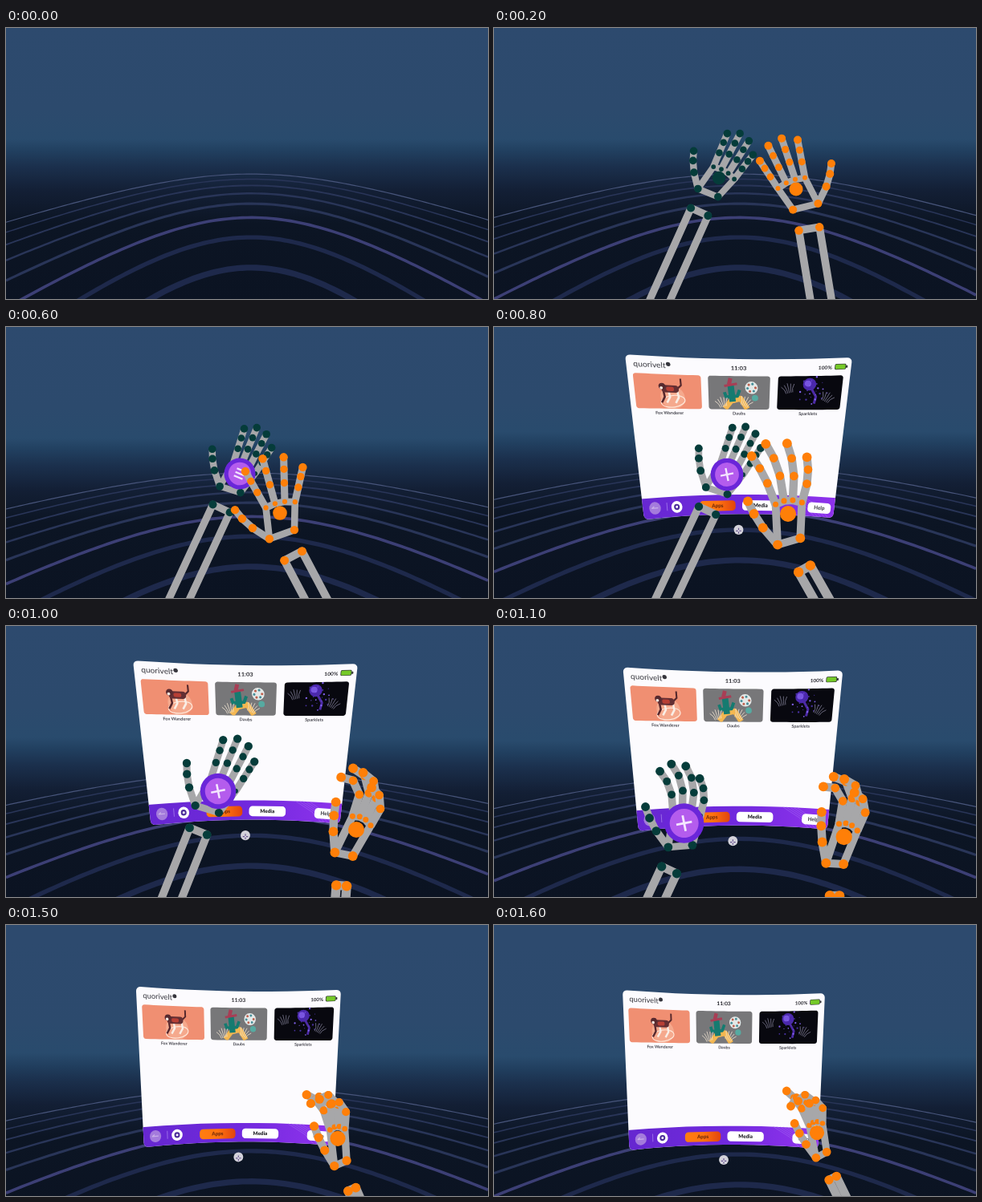
Write an HTML page with a canvas that moves like this. It is 600 by 338 pixels and loops after 1.7 s.

```html
<!DOCTYPE html>
<html lang="en">
<head>
<meta charset="utf-8">
<title>Hand menu</title>
<style>
html, body { margin: 0; width: 100%; height: 100%; overflow: hidden; background: #0b1424; }
canvas { display: block; width: 600px; height: 338px; }
</style>
</head>
<body>
<canvas id="stage" width="600" height="338"></canvas>
<script>
const ctx = document.getElementById('stage').getContext('2d');
const LOOP = 1700, STEP = 100, TAU = Math.PI * 2;
const ORANGE = '#ff7f08', TEAL = '#053c3a', BONE = '#a7a7a9', PURPLE = '#6a26d9';

const clamp = (x, lo, hi) => Math.min(hi, Math.max(lo, x));
const ramp = (t, from, to) => clamp((t - from) / (to - from), 0, 1);
const rad = deg => deg * Math.PI / 180;

// Linear track: one value list per key time
const track = (...keys) => t => {
  const i = keys.findIndex(k => k[0] > t);
  if (i <= 0) return keys[i ? keys.length - 1 : 0].slice(1);
  const [a, b] = [keys[i - 1], keys[i]], p = ramp(t, a[0], b[0]);
  return a.map((x, n) => x + (b[n] - x) * p).slice(1);
};

// time, palm x, y, tilt, width (negative: thumb on the left), scale, fan, index curl, fist curl, elbow x
const rightPose = track(
  [200, 376, 201, -19, 1, 1, 7.5, 0, 0, 408],
  [600, 341, 232, -14, -.95, 1.08, 14, 0, 0, 389],
  [800, 366, 233, -8, -.65, 1.4, 12, 6, 10, 411],
  [1000, 436, 254, 22, -.5, 1.4, 5, 45, 40, 416],
  [1300, 435, 281, 0, -.4, 1.5, 8, 45, 45, 440],
  [1600, 402, 259, -15, -.4, 1.15, 12, 15, 60, 436]);
const leftPose = track(
  [200, 280, 187, 28, -.9, .93, 5, 0, 0, 204],
  [600, 291, 183, 23, -.9, .93, 5, 0, 0, 213],
  [800, 290, 184, 24, -.9, .97, 5, 0, 0, 211],
  [1000, 264, 206, 23, -.9, 1.06, 5, 0, 0, 204],
  [1300, 182, 326, -40, -.6, 1.4, 8, 45, 50, 190]);

// Menu sheet: left, top, width of the top edge
const panelPose = track([800, 163, 34, 283], [1000, 158, 43, 280], [1300, 165, 68, 262], [1600, 160, 81, 252]);

function disc(x, y, r, color) {
  ctx.fillStyle = color;
  ctx.beginPath();
  ctx.arc(x, y, r, 0, TAU);
  ctx.fill();
}

function line(points, color, width) {
  ctx.strokeStyle = color;
  ctx.lineWidth = width;
  ctx.beginPath();
  points.forEach(p => ctx.lineTo(...p));
  ctx.stroke();
}

function pill(x, y, w, h, color, r = h / 2) {
  ctx.fillStyle = color;
  ctx.beginPath();
  ctx.roundRect(x - w / 2, y - h / 2, w, h, r);
  ctx.fill();
}

function blend(x0, y0, x1, y1, ...stops) {
  const g = ctx.createLinearGradient(x0, y0, x1, y1);
  stops.forEach(s => g.addColorStop(...s));
  return g;
}

function label(text, size, weight = 600, color = '#26262c', align = 'center') {
  ctx.font = `${weight} ${size}px Lato, sans-serif`;
  ctx.textAlign = align;
  ctx.textBaseline = 'middle';
  ctx.fillStyle = color;
  ctx.fillText(text, 0, 0);
}

function drawFloor(t) {
  const dy = t < 700 ? 0 : -8 + 33 * (t - 800) / 800;
  const spread = 180 + 50 * ramp(t, 0, 800);
  ctx.fillStyle = blend(0, dy, 0, 338 + dy, [0, '#2d4a6e'], [.3, '#2c4a6d'], [.41, '#294b6d'],
    [.455, '#213f5f'], [.51, '#1b304d'], [.6, '#131f35'], [.72, '#0c1524'], [1, '#0b1322']);
  ctx.fillRect(0, 0, 600, 338);
  // Concentric rings around the viewer project to hyperbolas
  for (let k = 7; k >= 0; k--) {
    const a = 1 / (.00559 + .0015 * k), pts = [];
    for (let x = 0; x <= 600; x += 6) pts.push([x, 120 + dy + a * Math.hypot(1, (x - 305) / spread)]);
    const color = k === 2 ? '#3c3f75' : k === 7 ? '#47547a' : k < 2 ? '#1e294b' : '#293558';
    line(pts, color, k === 2 ? 3.6 : Math.max(1.1, (a - 40) / 19));
  }
}

function drawHand([x, y, tilt, width, scale, fan, curl, fist, elbow], color) {
  const c = Math.cos(rad(tilt)) * scale, s = Math.sin(rad(tilt)) * scale;
  const place = ([px, py]) => [x + px * c - py * s, y + px * s + py * c];
  const flip = clamp(width * 1.7, -1, 1), r = 5 * Math.sqrt(scale), w = r * 1.75;

  const thumb = [0, .4, .72, 1].map(p =>
    place([width * (20 + 32 * p + 4 * Math.sin(p * Math.PI)), 26 - 42 * p]));
  const fingers = [0, 1, 2, 3].map(i => {
    const len = 54 - 4 * (i - 1.2) ** 2;
    let p = [(15 - 12 * i) * width, -12 + 1.3 * (i - 1.3) ** 2];
    const joints = [p];
    [.42, .31, .27].forEach((part, n) => {
      const a = rad(fan * (1.1 - i) + n * (i ? fist : curl));
      p = [p[0] + flip * Math.sin(a) * len * part, p[1] - Math.cos(a) * len * part];
      joints.push(p);
    });
    return joints.map(place);
  });
  const heel = place([-12 * width, 23]);

  // Forearm: two bones running from below the wrist past the elbow
  const mx = (thumb[0][0] + heel[0]) / 2, my = (thumb[0][1] + heel[1]) / 2;
  const dx = elbow - mx, dy = Math.max(20, 345 - my), d = Math.hypot(dx, dy);
  const ux = dx / d, uy = dy / d, half = 13 * Math.abs(width);
  const bone = (side, along) => [mx + ux * along + uy * side * half, my + uy * along - ux * side * half];
  const near = 28 * scale, far = near + 200;

  ctx.lineJoin = 'round';
  line([bone(-1, far), bone(-1, near), bone(1, near), bone(1, far)], BONE, w * 1.1);
  [-1, 1].forEach(k => disc(...bone(k, near), r * 1.05, color));
  line([heel, thumb[0], ...fingers.map(f => f[0]), heel], BONE, w * .95);
  disc(x, y, r * 1.7, color);
  disc(...heel, r, color);
  [thumb, ...fingers].forEach((f, n) => {
    line(f, BONE, w);
    f.forEach((p, i) => disc(...p, i === 3 || !n ? r : i ? r * .9 : r * .6, color));
  });
}

function drawButton(x, y, r, open) {
  ctx.save();
  ctx.translate(x, y);
  ctx.scale(r / 20, r / 20);
  ctx.rotate(open ? -.2 : .4);
  disc(0, 0, 20, PURPLE);
  disc(0, 0, 14.6, '#b45ced');
  const bars = open ? [[[-8, 0], [8, 0]], [[0, -8], [0, 8]]]
                    : [-5, 0, 5].map(h => [[-6, h], [6, h]]);
  bars.forEach(b => line(b, '#f5e6ff', 2.3));
  ctx.restore();
}

// App pictures, drawn in a 78 by 43 box
function fox() {
  disc(43, 28, 14, '#f5a98d');
  ctx.strokeStyle = '#ffe6d8';
  ctx.lineWidth = 1.2;
  ctx.beginPath();
  ctx.ellipse(43, 33, 14, 7, -.2, 0, TAU);
  ctx.stroke();
  line([[49, 18], [54, 13], [54, 5]], '#55282c', 2);
  [33, 39, 49].forEach((x, i) => line([[x, 20], [x + 1, 28], [x - 3, 35]], i ? '#f9eee6' : '#57282d', 2.4));
  pill(41, 18, 20, 9, '#642f33', 4);
  pill(41, 18, 9, 5, '#b83f35', 2);
  disc(32, 15, 4, '#572a2f');
  disc(31, 17, 1.8, '#f6e8df');
}

function daubs() {
  line([[20, 42], [28, 32], [40, 29], [48, 42]], '#f4b751', 7);
  line([[28, 12], [30, 33]], '#157b70', 8);
  line([[20, 21], [22, 27], [36, 26], [39, 18]], '#157b70', 4);
  line([[20, 13], [36, 10]], '#a83e55', 3);
  line([[26, 11], [28, 3]], '#a83e55', 5);
  disc(54, 15, 8, '#e3e8e7');
  for (let a = 0; a < 6; a++)
    disc(54 + 5 * Math.cos(a), 15 + 5 * Math.sin(a), 1.6, a % 2 ? '#478e99' : '#bf604e');
  disc(58, 28, 4, '#56aaa1');
  palmLine(17, 35, -.3, '#eee2d0');
  palmLine(46, 34, .5, '#eee2d0');
}

function sparks() {
  disc(38, 11, 8, '#4b28ad');
  disc(36, 10, 4, '#7855e0');
  line([[40, 16], [46, 27], [44, 36]], '#4c2ba5', 3);
  for (let i = 0; i < 24; i++) {
    const a = i * 2.4, d = 4 + i * .65;
    disc(42 + d * Math.cos(a), 20 + d * Math.sin(a), .6 + i % 3 * .3, i % 2 ? '#8161ed' : '#4730a0');
  }
  palmLine(13, 17, -.25, '#77758b');
  palmLine(59, 29, .5, '#77758b');
}

function palmLine(x, y, turn, color) {
  ctx.save();
  ctx.translate(x, y);
  ctx.rotate(turn);
  for (let i = -2; i <= 2; i++) line([[i * 2, 5], [i * 2.4, 0], [i * 4, -8 + Math.abs(i) * 1.5]], color, .8);
  ctx.restore();
}

const apps = [
  [.025, .33, 'Fox Wanderer', '#f08f72', fox],
  [.362, .642, 'Daubs', '#777779', daubs],
  [.678, .97, 'Sparklets', '#08080f', sparks]
];

function drawPanel([x, y, w]) {
  // Curved sheet: a trapezium whose top edge sags and bottom edge arches
  const base = 235, inset = (w - base) / 2, h = 200 + (w - 252) * .2;
  const P = (u, v) => [
    x + inset * v + u * (w + (base - w) * v),
    y + h * v + u * (4 - 6 * v) + (4 - 10 * v) * (1 - (2 * u - 1) ** 2)
  ];
  const sheet = (u0, v0, u1, v1, r) => {
    const ru = r, rv = r * 1.28, pts = [];
    const corner = (u, v, q) => {
      for (let a = q; a <= q + 1; a += .25)
        pts.push([u + ru * Math.cos(a * Math.PI / 2), v + rv * Math.sin(a * Math.PI / 2)]);
    };
    const edge = (from, to, v) => {
      for (let i = 1; i < 12; i++) pts.push([from + (to - from) * i / 12, v]);
    };
    corner(u1 - ru, v1 - rv, 0);
    edge(u1 - ru, u0 + ru, v1);
    corner(u0 + ru, v1 - rv, 1);
    corner(u0 + ru, v0 + rv, 2);
    edge(u0 + ru, u1 - ru, v0);
    corner(u1 - ru, v0 + rv, 3);
    ctx.beginPath();
    pts.forEach(p => ctx.lineTo(...P(...p)));
    ctx.closePath();
  };
  // Draw in local pixels tangent to the sheet
  const at = (u, v, draw) => {
    const e = .02, o = P(u, v), a = P(u + e, v), b = P(u, v + e);
    const sx = 1 / (e * 250), sy = 1 / (e * 197);
    ctx.save();
    ctx.transform((a[0] - o[0]) * sx, (a[1] - o[1]) * sx, (b[0] - o[0]) * sy, (b[1] - o[1]) * sy, ...o);
    draw();
    ctx.restore();
  };

  ctx.save();
  sheet(0, 0, 1, 1, .022);
  ctx.fillStyle = '#fcfbfe';
  ctx.fill();
  ctx.clip();
  sheet(-.1, .875, 1.1, 1.1, .01);
  ctx.fillStyle = blend(x, 0, x + w, 0, [0, '#6527cf'], [.5, '#7029dd'], [1, '#9434ef']);
  ctx.fill();
  for (let u = .76; u < .84; u += .018)
    line([P(u, .875), P(u + .09, .94), P(u + .14, 1)], '#a263f3', .6);
  ctx.restore();

  at(.032, .055, () => {
    label('quorivelt', 9.2, 400, '#36363d', 'left');
    disc(ctx.measureText('quorivelt').width + 3, -2, 2.5, '#36363d');
  });
  at(.5, .06, () => label('11:03', 6.8, 700));
  at(.885, .06, () => label('100%', 6, 700));
  at(.952, .055, () => {
    pill(0, 0, 12.5, 7, '#353b36', 1.5);
    pill(7, 0, 2, 3, '#353b36', .5);
    pill(0, 0, 11, 5.6, '#75c928', 1);
  });

  const top = .11, bottom = .325;
  apps.forEach(([u0, u1, name, color, art]) => {
    const [o, a, b] = [P(u0, top), P(u1, top), P(u0, bottom)];
    ctx.save();
    sheet(u0, top, u1, bottom, .012);
    ctx.fillStyle = color;
    ctx.fill();
    ctx.clip();
    ctx.transform((a[0] - o[0]) / 78, (a[1] - o[1]) / 78, (b[0] - o[0]) / 43, (b[1] - o[1]) / 43, ...o);
    art();
    ctx.restore();
    at((u0 + u1) / 2, .352, () => label(name, 5.3, 700, '#44444c'));
  });

  at(.063, .938, () => {
    disc(0, 0, 7.5, '#a47bdc');
    line([[4, 0], [-4, 0], [-1, -2]], '#c9afe9', 1.2);
  });
  at(.126, .935, () => line([[0, -5], [0, 5]], '#9c70e8', 1));
  at(.177, .94, () => {
    disc(0, 0, 7.2, '#fff');
    disc(0, 0, 3.7, '#4d2e9b');
    disc(0, 0, 1.5, '#fff');
  });
  const tab = (u, width, text, color, ink) => at(u, .945, () => {
    pill(0, 0, width, 13, color, 4.5);
    label(text, 6.6, 900, ink);
  });
  tab(.39, 47, 'Apps', blend(-23, 0, 23, 0, [0, '#ff7d10'], [.5, '#ff7410'], [1, '#e2460c']), '#7c300b');
  tab(.615, 48, 'Media', '#fff', '#26262c');
  tab(.922, 30, 'Help', '#fff', '#55545d');

  // Drag handle below the sheet
  at(.5, 1, () => {
    ctx.translate(0, 20);
    disc(0, 0, 6.3, '#d3d2da');
    line([[-3.5, 1.5], [3.5, 1.5]], '#66538f', 1.2);
    line([[0, -2], [0, 5]], '#66538f', 1.2);
    disc(0, 1.5, 1, '#f3f2f7');
  });
}

function draw(t) {
  drawFloor(t);
  if (t >= 700) drawPanel(panelPose(t));
  if (t < 100) return;
  const left = leftPose(t);
  left[1] += Math.max(0, t - 1300) * .5;
  drawHand(left, TEAL);
  if (t > 300 && t < 1200) drawButton(left[0], left[1], 21 * left[4] * ramp(t, 300, 500), t >= 700);
  drawHand(rightPose(t), ORANGE);
}

const start = performance.now();
function tick() {
  const t = (performance.now() - start) % LOOP;
  draw(Math.floor(t / STEP) * STEP);
  requestAnimationFrame(tick);
}
tick();
</script>
</body>
</html>
```
